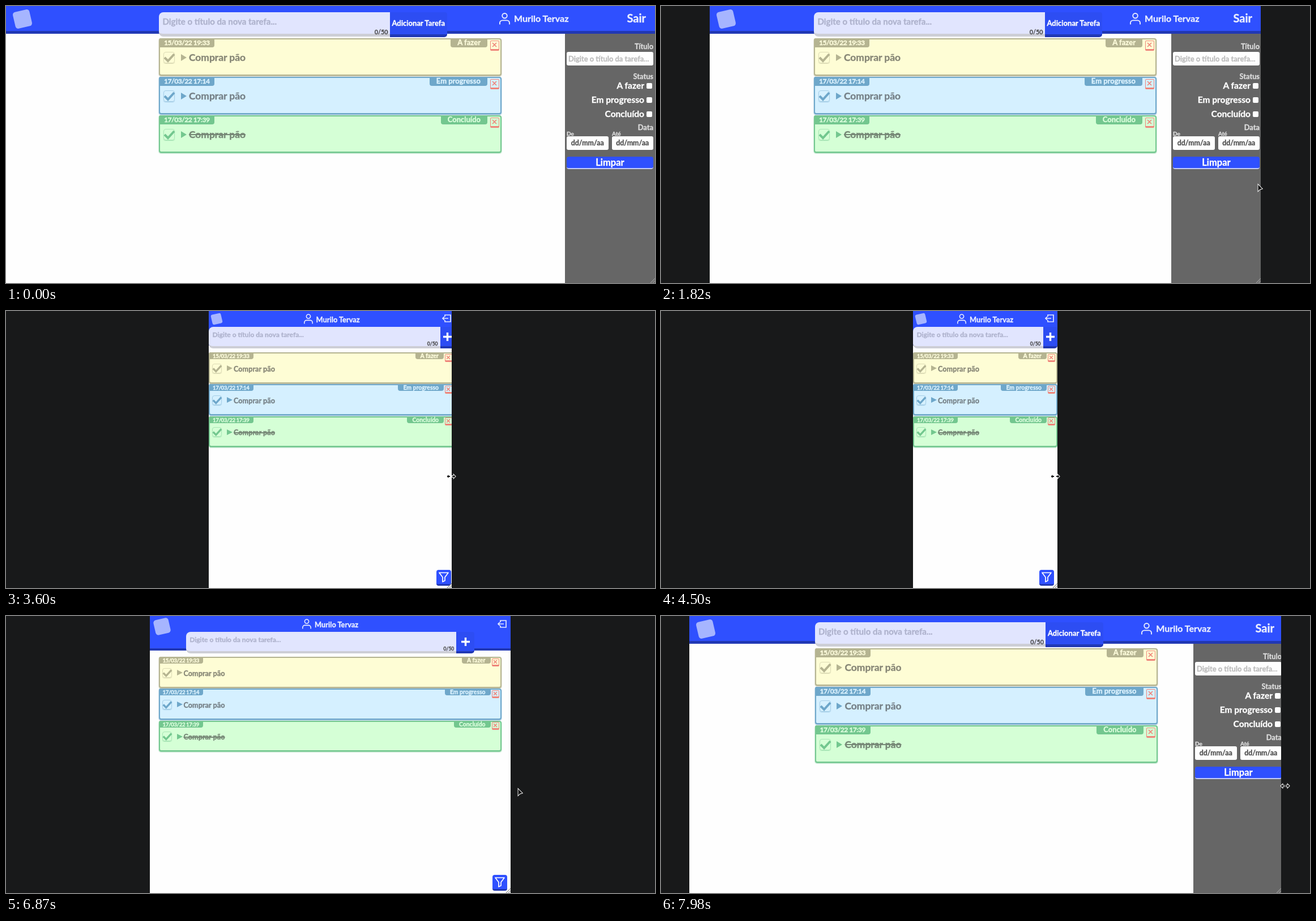
Recreate the animation shown at these times as an HTML page. Size 1146 by 489 pixels, loop 8 s.

```html
<!DOCTYPE html>
<html lang="pt-BR">
<head>
<meta charset="utf-8">
<title>Lista de tarefas</title>
<style>
* { box-sizing: border-box; }
html, body { margin: 0; width: 100%; height: 100%; overflow: hidden; background: #18191a; }
body { position: relative; font: 700 13px/20px Lato, sans-serif; white-space: nowrap; -webkit-text-stroke: .35px; }
svg { display: block; fill: none; overflow: visible; }
.page *, .cursor, .app, .page, .grip { position: absolute; }
.page svg * { position: static; }
.app { top: 0; height: 489px; overflow: hidden; background: #fefefe; }
.page { left: 0; top: 0; height: 489px; }
.grip { right: 0; bottom: 0; stroke: #999; stroke-width: 1.2; }

/* header, compact by default */
.bar { left: 0; right: 0; top: 0; height: 61px; background: #2f50ff; border-bottom: 4px solid #2138b4; }
.logo { left: 8px; top: 5px; width: 27px; height: 27px; border-radius: 5px; background: #a6b5ff; transform: rotate(-13deg); }
.form { left: 10%; top: 28px; width: 80%; height: 38px; }
.field { left: 0; right: 32px; top: 0; bottom: 0; background: #e1e5fe; border-bottom: 4px solid #cdced6; border-radius: 8px 0 0 8px; }
.hint { left: 6.5px; top: 4px; font-size: 12px; color: #afb3cd; }
.count { right: 4px; top: 20px; font-size: 8.5px; color: #555; }
.add { right: 0; top: 0; bottom: 0; width: 32px; background: #2d4df3; border-bottom: 4px solid #2138b4; border-radius: 0 4px 5px 0; }
.add svg { left: 50%; top: 9.5px; margin-left: -7.5px; stroke: #fff; stroke-width: 3.4; }
.label { left: 0; right: 0; top: 9px; text-align: center; color: #fff; }
.user { left: calc(50% - 49.5px); top: 4.5px; height: 20px; color: #e9edff; }
.user svg { left: 0; top: 0; width: 16px; height: 18px; stroke: #e9edff; stroke-width: 2; }
.name { left: 22px; top: 0; font-size: 12.8px; }
.exit { right: 7px; top: 7px; stroke: #e3e8ff; stroke-width: 1.7; }
.leave { right: 16px; top: 11px; font-size: 20px; color: #e9edff; }
.filter { right: 6.5px; top: 457px; width: 25.5px; height: 27.5px; border-radius: 4px; background: #2f50ff; border-bottom: 3px solid #2138b4; }
.filter svg { left: 4px; top: 3.5px; stroke: #fff; stroke-width: 1.7; stroke-linejoin: round; }

/* cards */
.list { left: calc(50% - min(303px, 50%)); top: 72px; width: min(605px, 100%); }
.card { left: 0; width: 100%; height: 54.5px; border-radius: 4px; background: var(--fill); border: 2px solid var(--ink); box-shadow: 0 1px 2px var(--ink); }
.card > * { margin: -2px; }
.card:nth-child(2) { top: 56.3px; }
.card:nth-child(3) { top: 112.6px; }
.tag { top: 0; height: 12px; line-height: 12px; background: var(--ink); color: color-mix(in srgb, var(--fill) 80%, #fff); }
.date { left: 0; padding: 0 7px; font-size: 9.8px; letter-spacing: -.45px; border-radius: 3px 0 4px 0; }
.state { right: 19px; padding: 0 9px; font-size: 10.4px; border-radius: 0 0 4px 4px; }
.del { right: 4px; top: 2.5px; width: 13px; height: 14px; border: 1.5px solid #ef857a; border-bottom-width: 3px; border-radius: 2px; }
.del svg { left: 2px; top: 2px; width: 6px; height: 6px; stroke: #ef857a; stroke-width: 2; }
.box { left: 6px; top: 19.5px; width: 17px; height: 17px; border: 1px solid color-mix(in srgb, var(--ink) 45%, var(--fill)); border-radius: 4px; box-shadow: 0 1px 1px color-mix(in srgb, var(--ink) 50%, var(--fill)); }
.box svg { inset: -1px; stroke: var(--ink); stroke-width: 4; }
.play { left: 32px; top: 23px; border: solid transparent; border-width: 5.5px 0 5.5px 10px; border-left-color: var(--ink); }
.what { left: 44px; top: 18.5px; font-size: 12.7px; color: #323232; opacity: .58; }
.done .what { text-decoration: line-through; text-decoration-thickness: 1.5px; }

/* filter panel */
.side { right: 0; top: 49px; width: 159px; height: 440px; padding: 0; background: #666; color: #fefefe; }
.cap { right: 3px; color: #dcdcdc; font-size: 12.8px; }
.opt { right: 19px; font-size: 15.5px; }
.opt::after { content: ""; position: absolute; right: -13.5px; top: 6px; width: 10px; height: 10px; border-radius: 2px; background: #fefefe; }
.mini { font-size: 10px; color: #dcdcdc; top: 166px; }
.in { height: 24px; line-height: 24px; background: #fefefe; border-radius: 3px; text-align: center; font-size: 12.4px; color: #555; }
.clear { left: 3px; right: 3px; top: 217px; height: 22px; border-radius: 4px; background: #2f50ff; border-bottom: 2px solid #c3cbfa; text-align: center; font-size: 16.5px; }

/* one header row */
.row .bar { height: 42px; }
.row .form { left: 67px; top: 8px; width: 64.7%; }
.row .user { left: 78.3%; top: 10.5px; }
.row .exit { top: 12px; }
.row .filter { right: 13px; top: 451px; }
.row .list { top: 53px; }

/* phone */
.narrow .logo { left: 4.5px; top: 4.5px; width: 18px; height: 18px; border-radius: 3px; }
.narrow .form { left: 0; width: 100%; }
.narrow .field { right: 25.5px; }
.narrow .add { width: 25.5px; }
.narrow .exit { right: 6px; top: 6px; }
.narrow .list { top: 73px; }

/* desktop */
.page:not(.wide) :is(.side, .leave, .label), .wide :is(.exit, .filter, .add svg) { display: none; }
.wide .bar { height: 49px; border-width: 5px; }
.wide .logo { left: 14px; top: 7.5px; width: 30px; height: 30px; }
.wide .form { left: calc(50% - 303px); top: 11px; width: 509px; height: 44px; }
.wide .field { right: 101.5px; bottom: 1px; border-width: 5px; }
.wide .hint { top: 6px; font-size: 15px; }
.wide .count { right: 3px; top: 25px; font-size: 10.8px; }
.wide .add { width: 101.5px; border-width: 5px; }
.wide .user { left: calc(75% + 11.5px); top: 12px; }
.wide .user svg { width: 19px; height: 21px; }
.wide .name { left: 26px; font-size: 16px; }
.wide .list { top: 57px; }
.wide .card { height: 66px; }
.wide .card:nth-child(2) { top: 68px; }
.wide .card:nth-child(3) { top: 136px; }
.wide .tag { height: 15.5px; line-height: 15.5px; }
.wide .date { padding: 0 9px; font-size: 12.2px; letter-spacing: -.55px; }
.wide .state { right: 25px; padding: 0 12px; font-size: 13px; }
.wide .del { top: 4px; width: 16px; height: 17.5px; }
.wide .del svg { left: 3px; top: 3px; width: 7px; height: 7px; }
.wide .box { left: 8px; top: 24px; width: 20px; height: 20px; }
.wide .play { left: 38.5px; top: 27.5px; border-width: 6px 0 6px 10.5px; }
.wide .what { left: 53px; top: 24px; font-size: 17.4px; }

.cursor { fill: #111; stroke: #fff; stroke-width: 1.8; paint-order: stroke; left: 0; top: 0; }
</style>
</head>
<body>
<div class="app">
  <div class="page">
    <div class="bar"></div>
    <div class="logo"></div>
    <div class="user">
      <svg viewBox="0 0 20 22"><circle cx="10" cy="5.5" r="4.5"/><path d="M1 21.5v-2.5a5 5 0 0 1 5-5h8a5 5 0 0 1 5 5v2.5"/></svg>
      <span class="name">Murilo Tervaz</span>
    </div>
    <span class="leave">Sair</span>
    <svg class="exit" width="16" height="14"><path d="M5 4V1h10v12H5v-3M11 7H1M4 4L1 7l3 3"/></svg>
    <div class="list"></div>
    <div class="form">
      <div class="field">
        <span class="hint">Digite o título da nova tarefa...</span>
        <span class="count">0/50</span>
      </div>
      <div class="add">
        <span class="label">Adicionar Tarefa</span>
        <svg width="15" height="15"><path d="M7.5 0v15M0 7.5h15"/></svg>
      </div>
    </div>
    <div class="side">
      <span class="cap" style="top:12px">Título</span>
      <div class="in" style="left:3px;right:3px;top:32px;padding-left:3px;text-align:left;font-size:12.9px;color:#bdbdbd">Digite o título da tarefa...</div>
      <span class="cap" style="top:65px">Status</span>
      <span class="opt" style="top:81px">A fazer</span>
      <span class="opt" style="top:106px">Em progresso</span>
      <span class="opt" style="top:130.5px">Concluído</span>
      <span class="cap" style="top:155px">Data</span>
      <span class="mini" style="left:3px">De</span>
      <span class="mini" style="left:83px">Até</span>
      <div class="in" style="left:3px;top:181px;width:73.5px">dd/mm/aa</div>
      <div class="in" style="right:3px;top:181px;width:73.5px">dd/mm/aa</div>
      <div class="clear">Limpar</div>
    </div>
    <div class="filter"><svg width="18" height="18"><path d="M1 1h16l-6 8v6l-4 2V9z"/></svg></div>
  </div>
  <svg class="grip" width="9" height="9"><path d="M1 9L9 1M5 9l4-4"/></svg>
</div>
<svg class="cursor" id="arrow" width="8" height="12"><path d="M.5 .5v11l2.700-2.700 4.300-1.300z"/></svg>
<svg class="cursor" id="resize" width="16" height="8"><path d="M.5 4l3-3v2h2.500v2H3.500v2zM15.500 4l-3-3v2H10v2h2.500v2z"/></svg>
<script>
const $ = s => document.querySelector(s);
const app = $('.app'), page = $('.page'), arrow = $('#arrow'), resize = $('#resize');

const tasks = [
  ['15/03/22 19:33', 'A fazer', '#fefdd5', '#b5b491', ''],
  ['17/03/22 17:14', 'Em progresso', '#d5f0ff', '#6ea7ca', ''],
  ['17/03/22 17:39', 'Concluído', '#d5ffd6', '#73c78f', 'done']
];
$('.list').innerHTML = tasks.map(([date, state, fill, ink, cls]) => `
  <div class="card ${cls}" style="--fill:${fill};--ink:${ink}">
    <span class="tag date">${date}</span><span class="tag state">${state}</span>
    <div class="del"><svg viewBox="0 0 8 8"><path d="M0 0l8 8M8 0L0 8"/></svg></div>
    <div class="box"><svg viewBox="0 0 20 20"><path d="M2 10l6 6L19 4"/></svg></div>
    <div class="play"></div><span class="what">Comprar pão</span>
  </div>`).join('');

const LOOP = 8000;
// moments at which the screen refreshes
const ticks = [0, 520, 640, 1160, 1280, 1430, 1580, 1700, 1820, 1970, 2090, 2210, 2360, 2490,
  2650, 2770, 2930, 3070, 3190, 3310, 3460, 3600, 3720, 3840, 3960, 4080, 4230, 4350, 4500,
  4620, 4770, 4920, 5040, 5970, 6120, 6240, 6360, 6480, 6630, 6750, 6870, 6990, 7110, 7230,
  7350, 7500, 7620, 7740, 7860, 7980];
// time, left edge, extra layout width
const edge = [[640, 0, 0], [1160, 6, 0], [1280, 16, 0], [1430, 32, 1], [1820, 86, 1], [2210, 162, 1],
  [2490, 207, 0], [2770, 229, 0], [2930, 251, 1], [3310, 323, 3], [3600, 358, 5], [4080, 416, 1],
  [4350, 438, 0], [4620, 451, 0], [4770, 458, 0], [5040, 464, 0], [5970, 463, 0], [6120, 440, 0],
  [6480, 337, 0], [6870, 254, 0], [7350, 142, 2], [7980, 50, 4]];
// time, offset from right edge, height
const pointer = [[520, -2, 308], [1280, 2.5, 312], [1820, -1.5, 321], [2770, -6, 307],
  [3600, -1.5, 292], [4620, -4, 292], [5040, 6, 293], [5970, 5, 293], [6480, 19, 300],
  [6870, 17, 311], [7350, 16, 306], [7980, 7, 300]];

function at(keys, t) {
  const i = keys.findIndex(k => k[0] >= t);
  if (i <= 0) return keys[i ? keys.length - 1 : 0];
  const a = keys[i - 1], b = keys[i], p = (t - a[0]) / (b[0] - a[0]);
  return a.map((v, j) => v + (b[j] - v) * p);
}

function place(el, x, y, on) {
  el.style.display = on ? 'block' : 'none';
  el.style.left = x + 'px';
  el.style.top = y + 'px';
}

let last = -1;
function draw() {
  const now = performance.now() % LOOP;
  const t = ticks.filter(v => v <= now).pop();
  if (t !== last) {
    last = t;
    // the window stays whole until the drag begins
    const [, l, extra] = t < 1160 ? edge[0] : at(edge, t);
    const left = Math.round(l), right = left ? 1145 - left : 1146;
    const width = right - left + Math.round(extra);
    app.style.left = left + 'px';
    app.style.width = right - left + 'px';
    page.style.width = width + 'px';
    page.className = 'page ' + (width > 900 ? 'wide' : width > 640 ? 'row' : width > 500 ? 'stack' : 'narrow');
    const [, dx, y] = at(pointer, t);
    const x = Math.round(right + dx);
    const sizing = (t > 3300 && t < 6200) || t > 7400;
    place(arrow, x - 4, Math.round(y) - 6, t >= 520 && !sizing);
    place(resize, x - 8, Math.round(y) - 4, sizing);
  }
  requestAnimationFrame(draw);
}
draw();
</script>
</body>
</html>
```
